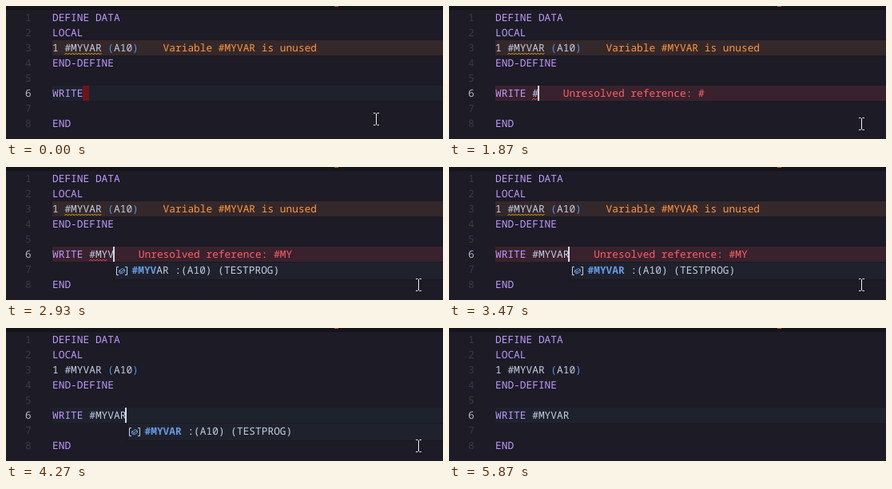
An HTML page with a canvas for the animation above (5.99 s loop, 547 px wide and 167 px high).

```html
<!DOCTYPE html>
<html lang="en">
<head>
<meta charset="utf-8">
<title>Editor diagnostics</title>
<style>
  html, body { margin: 0; width: 100%; height: 100%; overflow: hidden; background: #1c1b26; }
  canvas { display: block; }
</style>
</head>
<body>
<canvas id="stage" width="547" height="167"></canvas>
<script>
const WIDTH = 547, HEIGHT = 167, LOOP = 5990, TICK = 200 / 3;
const LEFT = 58, TOP = 5, LINE = 19, CHAR = 7.7;
const FONT = '12.83px "Noto Sans Mono", "DejaVu Sans Mono", monospace';
const COLOR = {
  back: '#1c1b26', strip: '#15141b', keyword: '#c099fa', text: '#c3cde2', paren: '#4f94e0',
  number: '#3a394a', activeNumber: '#b9b8c8', current: '#1d222d', trailing: '#6b151b',
  warnBack: '#35282a', warn: '#ff9640', warnWave: '#d6a520',
  errorBack: '#39222d', error: '#ff6064', errorWave: '#f0484c',
  popup: '#1f222d', popupEdge: '#17181f', match: '#689be4'
};
const WORD = '#MYVAR';
const KEY_TIMES = [1600, 2330, 2470, 2930, 3070, 3270];
const CARET_ON = [[400, 930], [1400, 2070], [2330, 3730], [4270, 4730], [5200, 5730]];
// time, x, y
const POINTER = [[0, 463, 142], [600, 419, 119], [733, 516, 148], [5000, 516, 148], [5466, 507, 178]];

const ctx = document.getElementById('stage').getContext('2d');
const within = (t, from, to) => t >= from && t < to;
const colX = col => LEFT + col * CHAR;
const rowY = row => TOP + (row - 1) * LINE;

function rect(color, x, y, w, h) {
  ctx.fillStyle = color;
  ctx.fillRect(x, y, w, h);
}

function text(str, x, baseline, color, bold = false) {
  ctx.font = (bold ? 'bold ' : '') + FONT;
  ctx.fillStyle = color;
  ctx.fillText(str, x, baseline);
}

function code(row, col, str, color) {
  text(str, colX(col), rowY(row) + 14, color);
}

function lineBack(row, color) {
  rect(color, LEFT, rowY(row), WIDTH - LEFT, LINE);
}

function stroke(color, width, path) {
  ctx.strokeStyle = color;
  ctx.lineWidth = width;
  ctx.stroke(new Path2D(path));
}

function wave(row, col, count, color) {
  const end = colX(col + count), y = rowY(row) + 17;
  let path = '';
  for (let x = colX(col), i = 0; x <= end; x += 2, i++) {
    path += `${i ? 'L' : 'M'}${x} ${y + (i % 2 ? -1 : 1)}`;
  }
  stroke(color, 1, path);
}

function drawPopup(col, typed) {
  const x = Math.ceil(colX(col)), y = 119, textX = x + 22.5;
  rect(COLOR.popupEdge, x, y, WIDTH - x, 23);
  rect(COLOR.popup, x + 1, y + 1, WIDTH - x, 21);
  ctx.save();
  ctx.translate(x + 3, y + 6);
  stroke(COLOR.text, 1, 'M3 .5H.5V10.5H3 M11 .5H13.5V10.5H11');
  stroke(COLOR.match, 1, 'M3.5 5L8 2.5L10.5 4V6.5L6 9L3.5 7.5Z M3.5 5L6 6.5L10.5 4 M6 6.5V9');
  ctx.restore();
  text(WORD.slice(0, typed), textX, 134, COLOR.match, true);
  text(WORD.slice(typed) + ' :(A10) (TESTPROG)'.slice(typed < WORD.length ? 0 : 0),
    textX + typed * CHAR, 134, COLOR.text);
}

function drawPointer(t) {
  const time = Math.floor(t / TICK + 0.06) * TICK;
  let i = POINTER.findIndex(p => p[0] > time);
  if (i < 0) return;
  const [t0, x0, y0] = POINTER[i - 1], [t1, x1, y1] = POINTER[i];
  const k = (time - t0) / (t1 - t0);
  ctx.save();
  ctx.translate(Math.round(x0 + (x1 - x0) * k), Math.round(y0 + (y1 - y0) * k));
  stroke('#f2f2f4', 1, 'M-3 -7.5H-.5 M1.5 -7.5H4 M.5 -7V7 M-3 7.5H-.5 M1.5 7.5H4');
  ctx.restore();
}

function draw(t) {
  const typed = KEY_TIMES.filter(time => t >= time).length;
  const caretCol = 6 + typed;
  const warning = t < 3530, error = within(t, 1870, 3530);

  rect(COLOR.back, 0, 0, WIDTH, HEIGHT);
  rect(COLOR.strip, 0, 0, WIDTH, TOP);
  rect('#b5532c', 411, 0, 5, 1);
  if (warning) lineBack(3, COLOR.warnBack);
  lineBack(6, error ? COLOR.errorBack : COLOR.current);
  if (!typed) rect(COLOR.trailing, 96, 100, 8, LINE);

  for (let row = 1; row <= 8; row++) {
    text(String(row), 24, rowY(row) + 14, row === 6 ? COLOR.activeNumber : COLOR.number);
  }
  const keywords = { 1: 'DEFINE DATA', 2: 'LOCAL', 4: 'END-DEFINE', 6: 'WRITE', 8: 'END' };
  for (const row in keywords) code(+row, 0, keywords[row], COLOR.keyword);

  code(3, 0, '1 ' + WORD, COLOR.text);
  code(3, 9, '(', COLOR.paren);
  code(3, 10, 'A10', COLOR.text);
  code(3, 13, ')', COLOR.paren);
  if (warning) {
    code(3, 18, 'Variable #MYVAR is unused', COLOR.warn);
    wave(3, 2, WORD.length, COLOR.warnWave);
  }

  code(6, 6, WORD.slice(0, typed), COLOR.text);
  const unresolved = t < 2730 ? '#' : '#MY';
  if (error) code(6, caretCol + 4, 'Unresolved reference: ' + unresolved, COLOR.error);
  if (within(t, 1800, 3470)) wave(6, 6, unresolved.length, COLOR.errorWave);
  if (CARET_ON.some(([from, to]) => within(t, from, to))) {
    rect('#d5d9e6', Math.round(colX(caretCol) - 1), 100, 2, LINE);
  }
  if (within(t, 2400, 5870)) drawPopup(caretCol, typed);
  drawPointer(t);
}

ctx.textRendering = 'geometricPrecision';
const start = performance.now();
function frame() {
  draw((performance.now() - start) % LOOP);
  requestAnimationFrame(frame);
}
frame();
</script>
</body>
</html>
```
